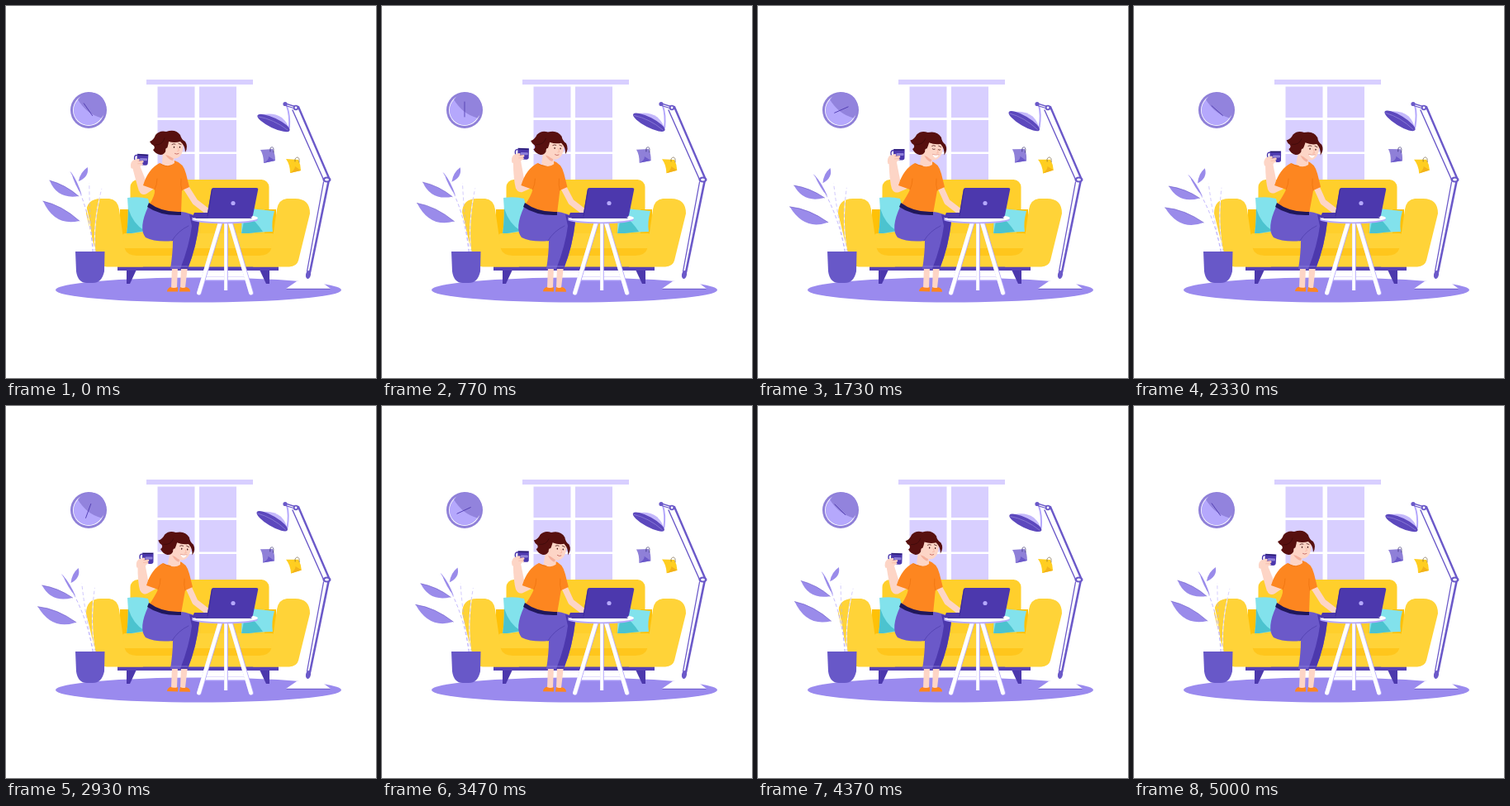
Write an HTML page with a canvas that moves like this. It is 448 by 450 pixels and loops after 5.03 s.

```html
<!DOCTYPE html>
<html lang="en">
<head>
<meta charset="utf-8">
<title>Coffee break on the sofa</title>
<style>
html, body { margin: 0; width: 100%; height: 100%; overflow: hidden; background: #fff; }
canvas { display: block; }
</style>
</head>
<body>
<canvas id="stage" width="448" height="450"></canvas>
<script>
const ctx = document.getElementById('stage').getContext('2d');
const LOOP = 5030;
const C = {
  pane: '#d8cfff', rug: '#9a8aee', deep: '#4c38ad', mid: '#6b59c9', ink: '#20175c',
  lilac: '#b5a8fc', ring: '#8f80d8', leaf: '#9a8bea', pot: '#6858c8',
  yellow: '#ffd338', back: '#ffcf2c', amber: '#ffc107', shade: '#ffc61c',
  teal: '#82e2ec', tealDark: '#4cc3cf', orange: '#fd8620', orangeDark: '#ee7410',
  skin: '#fdd5c6', skinDark: '#f4b09c', hair: '#57100f', hairDark: '#3a0a0a'
};
const TIMES = [0, 770, 1730, 2930, 3470, 4370];

// Smooth periodic interpolation; `turn` is the gain of one full loop.
function track(t, vals, turn = 0) {
  const n = TIMES.length;
  const at = i => {
    const k = Math.floor(i / n), j = i - k * n;
    return [TIMES[j] + k * LOOP, vals[j] + k * turn];
  };
  let i = 0;
  while (i < n - 1 && t >= TIMES[i + 1]) i++;
  const [a, b, c, d] = [at(i - 1), at(i), at(i + 1), at(i + 2)];
  const span = c[0] - b[0], u = (t - b[0]) / span;
  const m0 = (c[1] - a[1]) / (c[0] - a[0]) * span;
  const m1 = (d[1] - b[1]) / (d[0] - b[0]) * span;
  const u2 = u * u, u3 = u2 * u;
  return (2 * u3 - 3 * u2 + 1) * b[1] + (u3 - 2 * u2 + u) * m0 +
         (3 * u2 - 2 * u3) * c[1] + (u3 - u2) * m1;
}

function fill(d, color) {
  ctx.fillStyle = color;
  ctx.fill(new Path2D(d));
}
function line(d, color, w = 1, cap = 'round') {
  ctx.strokeStyle = color;
  ctx.lineWidth = w;
  ctx.lineCap = cap;
  ctx.lineJoin = 'round';
  ctx.stroke(new Path2D(d));
}
function oval(x, y, rx, ry, color, rot = 0) {
  ctx.fillStyle = color;
  ctx.beginPath();
  ctx.ellipse(x, y, rx, ry, rot, 0, 7);
  ctx.fill();
}
function box(x, y, w, h, color, r = 0) {
  ctx.fillStyle = color;
  ctx.beginPath();
  ctx.roundRect(x, y, w, h, r);
  ctx.fill();
}
function pivot(x, y, angle, draw, dx = 0, dy = 0) {
  ctx.save();
  ctx.translate(x + dx, y + dy);
  ctx.rotate(angle);
  ctx.translate(-x, -y);
  draw();
  ctx.restore();
}
// Draws once as is and once mirrored around the middle of the sofa.
function both(draw) {
  draw();
  ctx.save();
  ctx.translate(465, 0);
  ctx.scale(-1, 1);
  draw();
  ctx.restore();
}

function room() {
  box(170, 89, 129, 6, C.pane);
  for (const x of [183.5, 234]) {
    box(x, 97.5, 45, 37.5, C.pane);
    box(x, 138, 45, 38.5, C.pane);
    box(x, 179, 45, 40, C.pane);
  }
  oval(233, 343.5, 173, 15, C.rug);
}

function clock(angle) {
  oval(100, 126, 22, 22, C.ring);
  oval(100, 126, 19, 19, '#fff');
  oval(100, 126, 18.2, 18.2, C.lilac);
  fill('M87 113.300A18.200 18.200 0 1 1 115.500 135.500Q98 131 87 113.300Z', '#9283dd');
  pivot(100, 126, angle * Math.PI / 180, () => line('M100 134V116', C.deep, 0.8));
}

function sofa() {
  both(() => fill('M146 319H158L150 336H146Z', C.deep));
  box(135, 315, 195, 5, '#5642b4');
  box(150.5, 210, 168, 84, C.back, 9);
  box(138, 246, 189, 58, C.amber);
  box(152, 240, 161, 40, C.back);
  fill('M147 232Q161 230 172 233L182 272Q162 273 146 276Q149 253 147 232Z', C.teal);
  fill('M148 245Q148 262 146 276L168 272Q154 264 148 245Z', C.tealDark);
  fill('M286 243Q306 247 325 248Q321 262 323 273Q304 273 285 276Z', C.teal);
  fill('M290 250Q304 262 311 273L285 276Z', C.tealDark);
  box(135, 298, 195, 17.5, C.yellow);
  box(140, 275, 186, 27, C.shade, 5);
  box(140, 275, 186, 18, C.yellow, 5);
  both(() => fill('M97 251Q97 233 115 233H125Q135 234 137 246L144 294Q146 301 158 302L166 315.500H122Q113 315 111 308Z', C.yellow));
}

function leaf(d) {
  fill(d, C.leaf);
}

function plant(sway) {
  pivot(102, 297, sway, () => {
    line('M105 299Q103 247 83 203M108 299Q105 264 116 221', '#fff', 1);
    ctx.setLineDash([4, 3]);
    line('M105 298Q103 247 78 200', C.lilac, 0.8, 'butt');
    line('M106 298Q101 258 101 214M108 298Q105 264 116 221', C.lilac, 0.6, 'butt');
    ctx.setLineDash([]);
    leaf('M53 211Q72 216 88 230Q62 234 53 211Z');
    leaf('M45 236Q68 241 89 260Q59 267 45 236Z');
    leaf('M79 201Q87 212 92 229Q84 218 79 201Z');
    leaf('M99 195Q101 207 88 212Q90 201 99 195Z');
    line('M53 211Q72 216 88 230M45 236Q68 241 89 260', C.mid, 0.6);
  });
  fill('M84 297H119.500L119 321Q116 335 105 335H98Q87 335 85 321Z', C.pot);
}

function notes(a) {
  pivot(321, 172, a, () => {
    fill('M308 174L323 173Q326 179 326 187L312 190Q312 180 308 174Z', C.ring);
    fill('M312 190Q319 186 318 182L326 187Z', C.mid);
    line('M320 176V172Q323 169 324 173V177', C.ink, 0.6);
  });
  pivot(351, 185, -a, () => {
    fill('M339 185L354 186Q357 192 357 199L344 202Q344 192 339 185Z', '#ffce21');
    fill('M344 202Q350 198 350 194L357 199Z', '#f2b21a');
    line('M350 188V185Q353 181 355 185V189', '#6a5530', 0.6);
  });
}

function lamp(tilt) {
  fill('M339 342L352 333H381L393 342Z', '#fff');
  line('M340 342.300H392', C.mid, 1);
  fill('M384 212L393 209L370 323L364 322Z', '#fff');
  line('M391 210L368 322', C.mid, 2.6);
  line('M384.500 213L364.500 321', C.mid, 1.3);
  fill('M347 126L354 121L392 208L384 210Z', '#fff');
  line('M354 122L391 208', C.mid, 2.4);
  line('M347 126L384.500 210', C.mid, 1.4);
  oval(388.5, 210, 5, 3.6, C.mid);
  oval(388.5, 210, 2.4, 1.6, '#fff');
  oval(366, 325, 3, 5, C.mid, 0.2);
  pivot(347, 122, tilt, () => {
    line('M340 121Q344 132 343 147', C.lilac, 2);
    fill('M309 132Q323 128 334 135Q342 142 343 150L322 146Z', '#c4b8fb');
    oval(324, 141.5, 21.5, 6, '#5c48bd', 0.44);
    line('M306 134Q324 137 341 150', C.ring, 0.8);
  });
  line('M338 119L351 123', C.mid, 3.6);
  line('M340 119.800L350 123', '#fff', 1.2);
  oval(338, 118.5, 2.6, 2.6, C.mid);
  oval(351, 123, 3.2, 3.2, C.mid);
  oval(351, 123, 1.4, 1.4, '#fff');
}

function legs(tap) {
  fill('M201 315H208L207 341H200Z M212 315H220L217 341H211Z', C.skin);
  pivot(210, 345, tap, () => {
    fill('M199 340Q203 342 208 340L208 345.500H195Q195 342 199 340Z', C.orange);
    fill('M211 340Q214 342 218 340Q223 341 223 345.500H210Z', C.orange);
  });
  fill('M172 243L213 249Q232 252 234 261Q231 290 220 318H199Q202 299 202 284Q181 286 169 280Q160 269 172 243Z', C.mid);
  fill('M222 252Q233 255 234 261Q231 290 220 318H211Q222 290 225 266Z', C.deep);
  line('M201 284Q208 272 221 266', '#5443b2', 0.9);
  line('M200 315H220', '#8f80dc', 0.8);
}

function arm(shift, cx, cy) {
  const ex = 167 + cx * 0.2, ey = 222 + cy * 0.4;
  const hx = 158 + cx, hy = 195 + cy;
  line(`M${180 + shift} 213L${ex} ${ey}`, C.skin, 12);
  fill(`M${ex - 6} ${ey + 2}Q${ex - 9} ${ey - 8} ${hx - 5} ${hy}L${hx + 4} ${hy - 2}L${ex + 5} ${ey - 4}Z`, C.skin);
}

function cup(cx, cy, tilt) {
  pivot(164, 186, tilt, () => {
    line('M159 181Q155 180 155.500 185Q156 189 160 188', C.deep, 1.4);
    fill('M158.500 179H172V190Q172 192.500 169 192.500H162Q158.500 192 158.500 188Z', C.deep);
    line('M159.500 180H171', C.ink, 1);
    box(162, 184, 9, 3, C.ring, 1);
    fill('M152 197Q150 191 154 187L160 185Q163 185 161 188L166 187Q168 189 165 190Q168 192 164 193L160 198Z', C.skin);
    line('M160 188L165 187.500M160 191L165 190.500', C.skinDark, 0.6);
  }, cx, cy);
}

function head(lean, smile, blink) {
  pivot(196, 190, lean * 0.12, () => {
    fill('M190 174L203 178L204 190Q197 196 189 191Z', C.skin);
    fill('M193 180L203 183L202 187Q197 186 193 180Z', C.skinDark);
    fill('M193 162Q203 156 213 161Q216 169 213 178Q209 186 202 184Q194 181 193 173Z', C.skin);
    fill('M174 164Q179 162 181 156Q186 150 194 152Q205 148 211 156Q212 161 217 164Q221 170 217 177Q217 169 211 164Q204 166 197 164Q196 171 194 174Q192 180 187 180Q181 179 178 174Q181 172 179 169Q176 168 174 164Z', C.hair);
    line('M181 168Q190 168 192 160', C.hairDark, 0.7);
    oval(195, 174, 1.8, 2.6, C.skin);
    line('M201 167.500Q203 166 205 167M209 166.500L212 167.500', C.hairDark, 0.7);
    if (blink) line('M202 171Q203.500 172 205 171M209 171Q210 172 211.500 171', C.hairDark, 0.7);
    else {
      oval(203.5, 170.7, 0.7, 1, C.hairDark);
      oval(210.5, 170.7, 0.7, 1, C.hairDark);
    }
    line('M208 171L209.500 175L207.500 175.500', C.skinDark, 0.7);
    if (smile > 0.5) {
      fill('M203 177.500Q207 178.500 210.500 177Q209 182 206 181Q204 180 203 177.500Z', '#fff');
      line('M203 177.500Q207 178.500 210.500 177', '#c75a51', 0.4);
    } else line('M204.500 178.500Q207 180 209 178.500', '#b64b48', 0.7);
  }, lean * 7, lean);
}

function torso(lean) {
  const s = lean * 4;
  line(`M${215 + s} 215L229 237L242 247`, C.skin, 7.5);
  fill(`M${186 + s} 190Q${196 + s} 196 ${204 + s} 187Q${215 + s} 190 ${218 + s} 203L${222 + s} 219L${213 + s} 223L212 251Q190 252 173 241Q181 229 ${180 + s} 222L${166 + s} 217Q${172 + s} 197 ${186 + s} 190Z`, C.orange);
  line(`M${180 + s} 222Q${183 + s} 216 ${183 + s} 209M${213 + s} 223Q${211 + s} 217 ${212 + s} 209`, C.orangeDark, 0.8);
  line(`M${187 + s} 191Q${197 + s} 198 ${204 + s} 189`, C.orangeDark, 0.8);
  fill('M173 238Q189 250 212 249V253Q187 254 171 243Z', C.ink);
}

function table() {
  line('M237 330H291', C.lilac, 5, 'butt');
  line('M237 329.500H291', '#fff', 3.6, 'butt');
  line('M266.500 261V344', C.lilac, 4.6, 'butt');
  line('M266 261V344', '#fff', 3.6, 'butt');
  line('M260 261L234 347M271.500 261L297 347', C.lilac, 5.6);
  line('M259.500 261L233.500 347M271 261L296.500 347', '#fff', 4.8);
  oval(265, 258.5, 40, 4.8, C.lilac);
  oval(265, 256.5, 40, 5, '#fff');
  fill('M228 250H246L245 256.500H225Z', C.deep);
  fill('M251 220H303Q306 220 305 223L299 253Q298 256 295 256H245Q243 256 243.500 253L248.500 223Q249 220 251 220Z', C.deep);
  line('M249.500 222L244 254', '#3c2c97', 1);
  line('M230 256.500H297', '#3c2c97', 0.9);
  oval(275, 238.500, 2.6, 2.6, C.lilac);
}

function frame(now) {
  const t = now % LOOP;
  const sway = (1 - Math.cos(2 * Math.PI * (t + 200) / LOOP)) / 2;
  const lean = track(t, [0, 0.6, 1, 1, 0.95, 0.45]);
  const smile = track(t, [0, 0.2, 1, 0.6, 0, 0]);
  const cx = track(t, [0, 5.8, 5.5, 6.5, 5.8, 2.5]);
  const cy = track(t, [0, -7, -6, -1.5, -3.7, -1]);
  const hand = track(t, [-35, 0, 66, 200, 245, 315], 360);

  ctx.fillStyle = '#fff';
  ctx.fillRect(0, 0, 448, 450);
  room();
  clock(hand);
  notes(sway * 0.07);
  sofa();
  plant(-0.13 * sway);
  lamp(sway * 0.11);
  legs(sway * 0.03);
  arm(lean * 4, cx, cy);
  torso(lean);
  head(lean, smile, t > 1620 && t < 1840);
  cup(cx, cy, 0.06 - lean * 0.05);
  table();
}

const start = performance.now();
function tick() {
  frame(performance.now() - start);
  requestAnimationFrame(tick);
}
tick();
</script>
</body>
</html>
```
